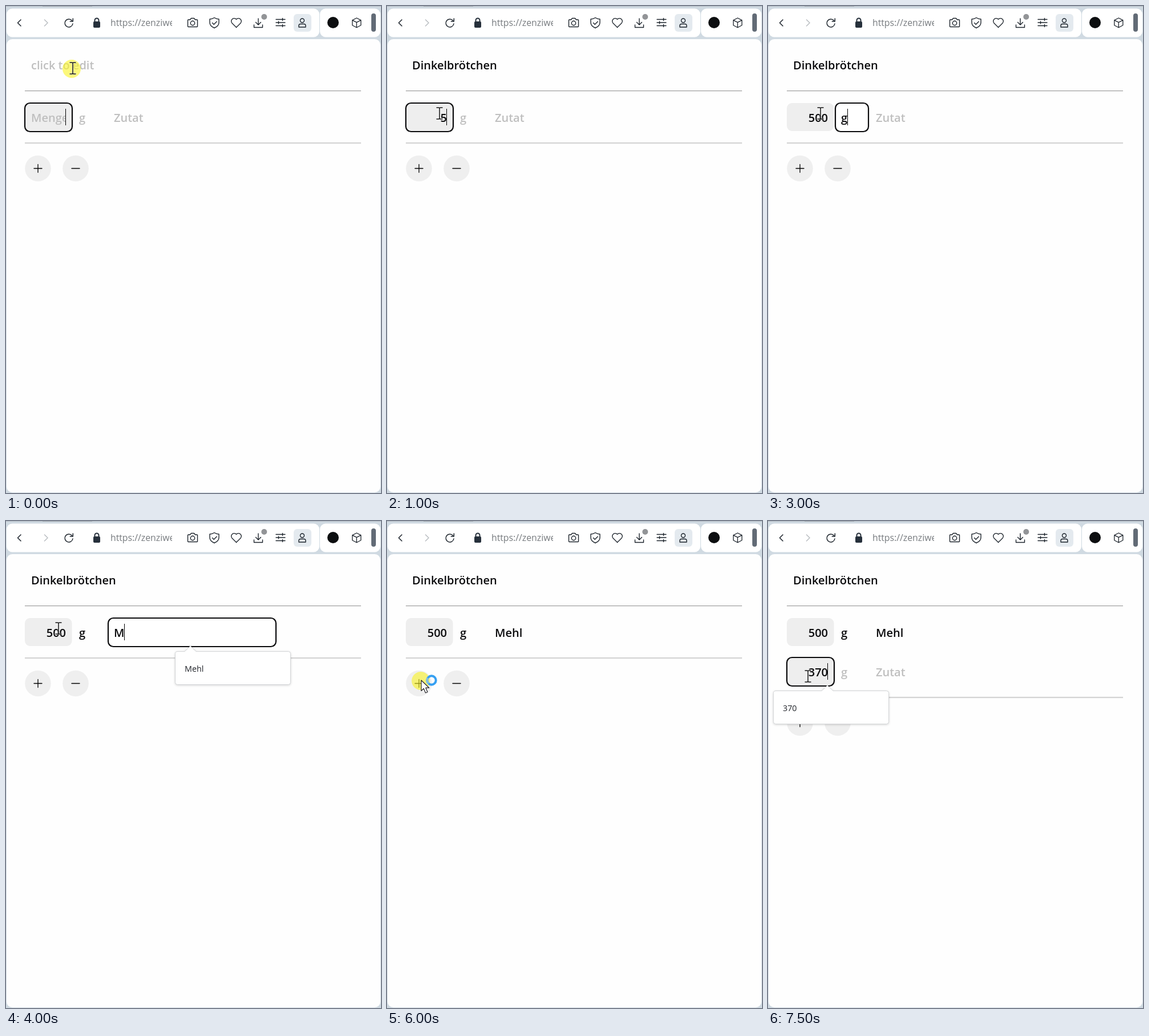
Write an HTML page with a canvas that moves like this. It is 657 by 853 pixels and loops after 8 s.

```html
<!DOCTYPE html>
<html lang="de">
<head>
<meta charset="utf-8">
<title>Rezept</title>
<style>
html, body { margin: 0; width: 100%; height: 100%; overflow: hidden; background: #d0dae2; }
canvas { display: block; }
</style>
</head>
<body>
<canvas id="stage" width="657" height="853"></canvas>
<script>
const ctx = document.getElementById('stage').getContext('2d');
const STEP = 500, INK = '#0b0b0d', HINT = '#bfbfbf', ICON = '#1d242c';
const BOLD = '600 20px "Open Sans", sans-serif';
const MENU = '14.3px "Open Sans", sans-serif';

function box(x, y, w, h, r, fill, stroke, lw = 1) {
  ctx.beginPath();
  ctx.roundRect(x, y, w, h, r);
  if (fill) { ctx.fillStyle = fill; ctx.fill(); }
  if (stroke) { ctx.strokeStyle = stroke; ctx.lineWidth = lw; ctx.stroke(); }
}

function disc(x, y, r, fill) {
  ctx.beginPath();
  ctx.arc(x, y, r, 0, Math.PI * 2);
  ctx.fillStyle = fill;
  ctx.fill();
}

function path(d, stroke, lw = 1.5, fill) {
  const p = new Path2D(d);
  ctx.lineCap = ctx.lineJoin = 'round';
  if (fill) { ctx.fillStyle = fill; ctx.fill(p); }
  if (stroke) { ctx.strokeStyle = stroke; ctx.lineWidth = lw; ctx.stroke(p); }
}

function label(s, x, y, color = INK, font = BOLD, align = 'left') {
  ctx.font = font;
  ctx.fillStyle = color;
  ctx.textAlign = align;
  ctx.fillText(s, x, y);
}

function clipped(x, y, w, h, draw) {
  ctx.save();
  ctx.beginPath();
  ctx.rect(x, y, w, h);
  ctx.clip();
  draw();
  ctx.restore();
}

function caret(x, y) {
  ctx.fillStyle = '#000';
  ctx.fillRect(Math.round(x), y, 1, 29);
}

function rule(y) {
  ctx.fillStyle = '#9c9c9c';
  ctx.fillRect(33, y, 589, 1);
  ctx.fillStyle = '#ececec';
  ctx.fillRect(33, y + 1, 589, 1);
}

function browser() {
  ctx.fillStyle = '#d0dae2';
  ctx.fillRect(0, 0, 657, 853);
  ctx.fillStyle = '#b4bcc4';
  ctx.fillRect(0, 0, 657, 1);
  ctx.fillStyle = '#969da4';
  ctx.fillRect(64, 0, 87, 1);
  box(1, 4.5, 548, 50, 10, '#fff');
  box(550, 4.5, 106, 50, 10, '#fff');
  box(1, 58, 655, 794, 10, '#fefefe');

  path('M26 24l-5.5 5.5 5.5 5.5', ICON);
  path('M67.500 24l5.500 5.500-5.500 5.500', '#b9bdc1');
  path('M115.500 25.500A7 7 0 1 0 117 31M117.300 22v5h-5', ICON);
  box(153, 27, 12, 11, 2, '#26303b');
  path('M155.500 27v-2a3.500 3.500 0 0 1 7 0v2', '#26303b', 2);
  clipped(180, 15, 111, 30, () =>
    label('https://zenziwe', 183, 35, '#777b7f', '15.8px "Open Sans", sans-serif'));

  path('M319.500 24h3l2-2.500h5l2 2.500h3q1 0 1 1v10.500q0 1-1 1h-15q-1 0-1-1v-10.500q0-1 1-1z', ICON, 1.4);
  ctx.beginPath();
  ctx.arc(327, 30, 3.7, 0, 7);
  ctx.stroke();
  path('M365 20.500q4 2.500 8 2.500v6q0 6-8 9.500q-8-3.500-8-9.500v-6q4 0 8-2.500zM361.500 29.500l2.700 2.700 5-5', ICON, 1.4);
  path('M403.500 37.500l-7.500-7.500a5 5 0 0 1 7.500-6.700a5 5 0 0 1 7.500 6.700z', ICON, 1.4);
  path('M442 22v11M437.500 28.500l4.500 4.500 4.500-4.500M434.500 33v4.500h15v-4.500', ICON, 1.4);
  disc(452.300, 19, 5, '#929497');
  path('M473 23.500h16M473 29h16M473 34.500h16M484.500 21.500v4M477.500 27v4M484.500 32.500v4', ICON, 1.4);
  box(504, 14, 31, 31, 6, '#e4eaef');
  path('M515.500 25.500a3.500 3.500 0 1 1 7 0a3.500 3.500 0 1 1-7 0zM513 37v-2.500q0-3 3-3h6q3 0 3 3v2.500z', ICON, 1.4);
  disc(573, 29, 10, '#0c0e10');
  path('M614.300 21l7.500 3.800v9l-7.500 4-7.500-4v-9zM606.800 24.800l7.500 3.800 7.500-3.800M614.300 28.600v9.200', ICON, 1.3);
  box(640, 13, 8, 32, 4, '#626b76');
}

function outline(x, y, w, h, fill) {
  box(x + 1, y + 1, w - 2, h - 2, 9, fill, INK, 2.2);
}

// One ingredient line; focus names the active field.
function row(y, { amount, unit, name, focus }) {
  if (focus === 'amount') outline(32, y - 1, 85, 52, '#eee');
  else box(33, y, 82.500, 49, 9, '#eee');
  clipped(44, y, 61, 49, () => amount
    ? label(amount, 105, y + 33, INK, BOLD, 'right')
    : label('Menge', 44, y + 33, HINT));
  if (focus === 'amount') caret(104, y + 10);

  if (focus === 'unit') outline(117, y - 1, 60, 52, '#fff');
  label('g', 128, y + 33, unit ? INK : HINT);
  if (focus === 'unit') caret(unit ? 139 : 128, y + 10);

  if (focus === 'name') outline(178, y - 1, 296, 52, '#fff');
  label(name || 'Zutat', 189, y + 33, name ? INK : HINT);
  if (focus === 'name') caret(189 + ctx.measureText(name || '').width, y + 10);
}

function buttons(y) {
  for (const x of [56, 122]) disc(x, y, 22.800, '#efefef');
  path(`M49 ${y}h14M56 ${y - 7}v14M115 ${y}h14`, '#000', 1.3);
}

function popup({ x, y, tip, items, hot }) {
  const w = 202, h = 46 * items.length + 12, r = 4;
  const p = new Path2D(`M${x + r} ${y}H${tip - 10}l10-9.500 10 9.500H${x + w - r}q${r} 0 ${r} ${r}` +
    `V${y + h - r}q0 ${r} ${-r} ${r}H${x + r}q${-r} 0 ${-r} ${-r}V${y + r}q0 ${-r} ${r} ${-r}z`);
  ctx.save();
  ctx.shadowColor = 'rgba(0,0,0,.2)';
  ctx.shadowBlur = 4;
  ctx.shadowOffsetY = 1;
  ctx.fillStyle = '#fff';
  ctx.fill(p);
  ctx.restore();
  ctx.strokeStyle = '#d3d5d7';
  ctx.lineWidth = 1;
  ctx.stroke(p);
  items.forEach((s, i) => {
    if (i === hot) {
      ctx.fillStyle = '#d7e1e9';
      ctx.fillRect(x + 0.5, y + 5.500 + 46 * i, w - 1, 46);
    }
    label(s, x + 16.500, y + 35 + 46 * i, '#22252b', MENU);
  });
}

function pointer({ x, y, kind, glow, busy }) {
  if (glow) disc(x - glow, y + 1, 16, 'rgba(250,244,35,.6)');
  if (kind === 'beam') {
    const d = `M${x - 5} ${y - 10}h4l1 1 1-1h4M${x} ${y - 9}v18M${x - 5} ${y + 10}h4l1-1 1 1h4`;
    path(d, 'rgba(255,255,255,.6)', 3);
    path(d, '#111', 1.5);
  } else {
    path(`M${x} ${y}v18.500l4.300-4 3.200 7.500 3.500-1.500-3.200-7.300h6z`, '#26262b', 1.2, '#fff');
  }
  if (busy) {
    ctx.lineCap = 'butt';
    ctx.lineWidth = 4;
    ctx.strokeStyle = '#36a0f2';
    ctx.beginPath();
    ctx.arc(x + 18, y, 7.700, 0, Math.PI * 2);
    ctx.stroke();
    ctx.strokeStyle = '#7fbfe8';
    ctx.beginPath();
    ctx.arc(x + 18, y, 7.700, 2.3, 3.7);
    ctx.stroke();
  }
}

const beam = { x: 92, y: 188, kind: 'beam' };
const amountMenu = (items, y = 229) => ({ x: 9.500, y: y - 0.5, tip: 104, items });
const mehlMenu = { x: 296.500, y: 228.500, tip: 323, items: ['Mehl'] };
const flour = { amount: '500', unit: true, name: 'Mehl' };

// Each scene is held for one step.
const scenes = [
  { title: '', rows: [{ focus: 'amount' }], mouse: { x: 117, y: 109, kind: 'beam', glow: 2 } },
  { preview: true, rows: [{}], mouse: { x: 222, y: 164, glow: 0.5 },
    menu: { x: 159.500, y: 138.500, tip: 187, hot: 0,
      items: ['Dinkelbrötchen', 'Dinkelbrötch', 'Haselnussfreuden', 'Dinkelbröt'] } },
  { rows: [{ amount: '5', focus: 'amount' }], mouse: beam },
  { rows: [{ amount: '50', focus: 'amount' }], mouse: beam, menu: amountMenu(['500', '50', '5000']) },
  { rows: [{ amount: '500', focus: 'amount' }], mouse: beam, menu: amountMenu(['500', '5000']) },
  { rows: [{ amount: '500', focus: 'unit' }], mouse: beam },
  { rows: [{ amount: '500', unit: true, focus: 'unit' }], mouse: beam },
  ...['', 'M', 'Me', 'Meh'].map(name => ({
    rows: [{ ...flour, name, focus: 'name' }], mouse: beam, menu: name && mehlMenu })),
  { rows: [flour], mouse: { x: 54, y: 286, glow: 0.5 } },
  { rows: [flour], mouse: { x: 60, y: 279, glow: 0.8, busy: true } },
  ...[['3'], ['3', '370', '300'], ['370', '370']].map(([amount, ...items]) => ({
    rows: [flour, { amount, focus: 'amount' }],
    mouse: { x: 70, y: 272, kind: 'beam' },
    menu: items.length && amountMenu(items, 298) }))
];

function draw(s) {
  browser();
  if (s.preview) {
    outline(32, 77, 575, 52, '#e8f0fe');
    label('Dinkelbrötchen', 43.500, 111, INK, '17.33px "Liberation Sans", Arial, sans-serif');
    caret(44, 89);
  } else if (s.title === '') {
    label('click to edit', 44, 111, HINT);
  } else {
    label('Dinkelbrötchen', 44, 111);
  }
  const shift = 69 * (s.rows.length - 1);
  rule(148);
  s.rows.forEach((r, i) => row(170 + 69 * i, r));
  rule(239.500 + shift);
  buttons(284.500 + shift);
  if (s.menu) popup(s.menu);
  pointer(s.mouse);
}

const start = performance.now();
function tick() {
  const t = (performance.now() - start) % (STEP * scenes.length);
  draw(scenes[Math.floor(t / STEP)]);
  requestAnimationFrame(tick);
}
tick();
</script>
</body>
</html>
```
